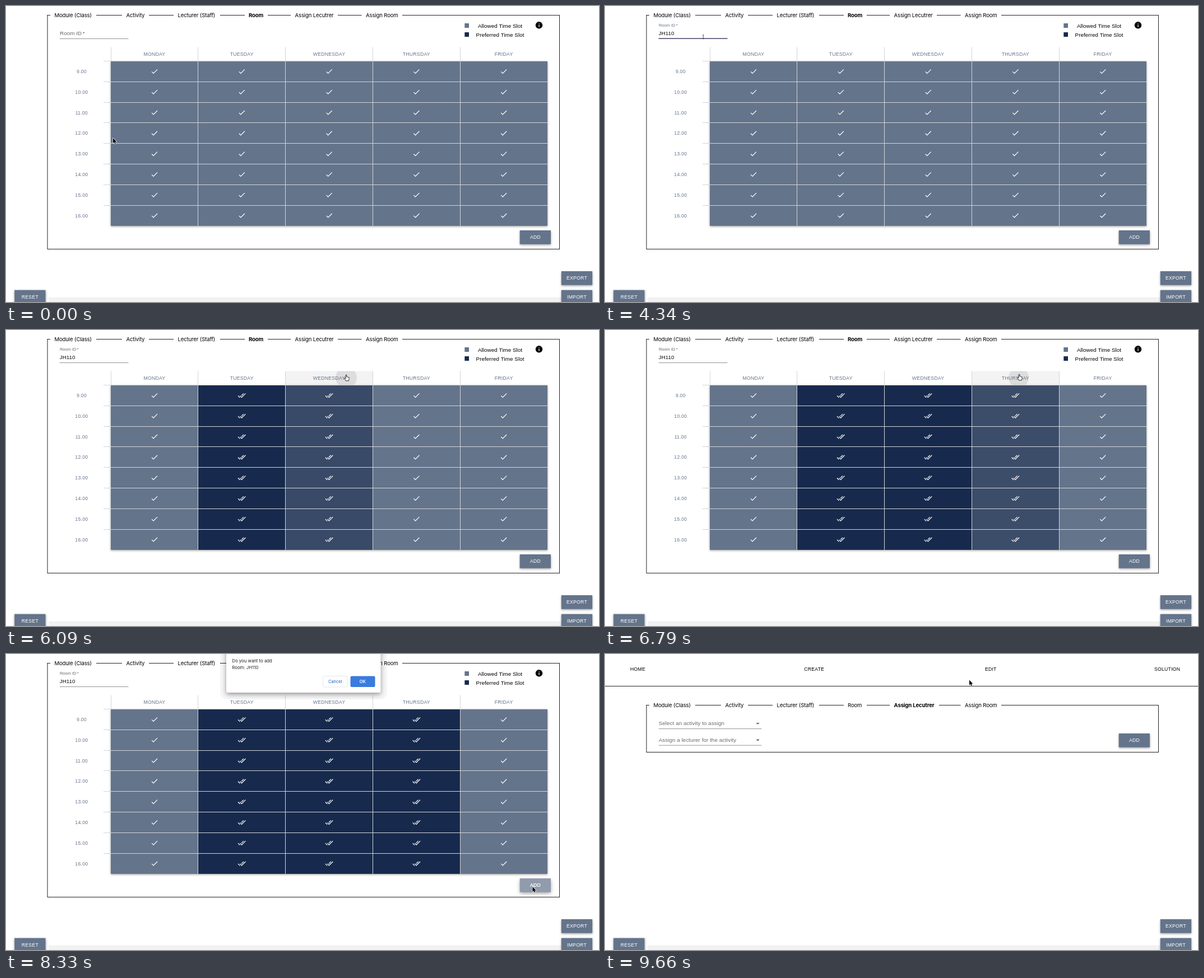
An HTML page with a canvas that plays this animation: 1058 by 529 pixels, repeating every 9.87 s.

```html
<!DOCTYPE html>
<html lang="en">
<head>
<meta charset="utf-8">
<title>Room timetable form</title>
<style>
html, body { margin: 0; width: 100%; height: 100%; overflow: hidden; background: #fff; }
canvas { display: block; }
</style>
</head>
<body>
<canvas width="1058" height="529"></canvas>
<script>
const c = document.querySelector('canvas').getContext('2d');
const LOOP = 9870, STEP = 70;
const SLATE = [100, 116, 139], NAVY = [23, 42, 77], FADED = [145, 157, 174];
const SANS = '"Liberation Sans", Arial, sans-serif', UI = 'Inter, sans-serif';
const GRID = { x: 187, y: 98.5, w: 155.8, h: 36.8, cols: 5, rows: 8 };
const RIGHT = GRID.x + GRID.w * GRID.cols, BOTTOM = GRID.y + GRID.h * GRID.rows;
const DAYS = ['MONDAY', 'TUESDAY', 'WEDNESDAY', 'THURSDAY', 'FRIDAY'];
const TABS = [['Module (Class)', 86.5], ['Activity', 214.5], ['Lecturer (Staff)', 306.5],
  ['Room', 433], ['Assign Lecutrer', 515.5], ['Assign Room', 642]];

const CHECK = new Path2D('M9 16.17 4.83 12l-1.42 1.41L9 19 21 7l-1.41-1.41z');
const DOUBLE = new Path2D('m18 7-1.41-1.41-6.34 6.34 1.41 1.41L18 7zm4.24-1.41L11.66 16.17 7.48 12l-1.41 1.41L11.66 19l12-12-1.42-1.41zM.41 13.41 6 19l1.41-1.41L1.83 12 .41 13.41z');
const ARROW = new Path2D('M0 0V9.2L2.1 7.3 3.4 10.2 4.9 9.6 3.7 6.7H6.4Z');
const HAND = new Path2D('M-.9.6Q0-.5.9.6V3.9Q1.8 3.2 2.4 4.2 3.3 3.6 3.9 4.6 5 4.2 5.1 5.4V7.6Q5 9 4.2 10.8H-.8Q-1.6 8.9-3.2 7.2-3.7 6-2.4 6L-.9 7Z');

// Pointer tip as [time, x, y]
const POINTER = [[0, 191, 236], [210, 191, 236], [560, 137.5, 51.5], [4270, 137.5, 51.5],
  [4550, 379, 76], [4690, 379, 76], [4970, 404, 79], [5390, 404, 79], [5740, 607, 80],
  [6160, 607, 80], [6510, 739, 79], [6860, 739, 79], [7280, 947, 377], [7490, 947, 377],
  [7770, 939.5, 416], [8680, 939.5, 416], [9310, 650, 46.5]];
// Column clicks as [column, time, x, y]
const CLICKS = [[1, 5137, 404, 85], [2, 5995, 607, 85], [3, 6700, 738, 85]];
// Typed text as [time, value]
const TYPED = [[2380, 'J'], [2660, 'JH'], [3500, 'JH1'], [3710, 'JH11'], [3850, 'JH110']];
const CARET = [[1190, 1750], [2310, 3150], [3500, 4340], [4830, 5180]];

const clamp = v => Math.min(1, Math.max(0, v));
const mix = (a, b, k) => a + (b - a) * k;
const rgb = (a, b = a, k = 0) => `rgb(${a.map((v, i) => mix(v, b[i], k))})`;
const easeOut = v => 1 - (1 - clamp(v)) ** 3;

// cubic-bezier(.4, 0, .2, 1)
function ease(v) {
  v = clamp(v);
  let lo = 0, hi = 1, s;
  for (let i = 0; i < 18; i++) {
    s = (lo + hi) / 2;
    if (1.2 * s * (1 - s) ** 2 + .6 * s * s * (1 - s) + s ** 3 < v) lo = s; else hi = s;
  }
  return 3 * s * s * (1 - s) + s ** 3;
}

function text(str, x, y, size, color, { align = 'left', gap = .07, font = SANS, weight = 400 } = {}) {
  c.font = `${weight} ${size}px ${font}`;
  c.letterSpacing = gap + 'px';
  c.textAlign = align;
  c.fillStyle = color;
  c.fillText(str, x, y);
}
const caps = (str, x, y, color, align = 'center') => text(str, x, y, 8.67, color, { align, gap: .25 });

function rect(x, y, w, h, color) {
  c.fillStyle = color;
  c.fillRect(x, y, w, h);
}
const hline = (x1, x2, y, color, h = 1) => rect(x1, y, x2 - x1, h, color);

function shadowed(blur, dy, alpha, draw) {
  c.save();
  c.shadowColor = `rgba(0,0,0,${alpha})`;
  c.shadowBlur = blur;
  c.shadowOffsetY = dy;
  draw();
  c.restore();
}

function rounded(x, y, w, h, r, fill, stroke) {
  c.beginPath();
  c.roundRect(x, y, w, h, r);
  c.fillStyle = fill;
  c.fill();
  if (stroke) { c.strokeStyle = stroke; c.lineWidth = 1; c.stroke(); }
}

function icon(path, x, y) {
  c.save();
  c.translate(x, y);
  c.scale(.619, .619);
  c.translate(-12, -12);
  c.fillStyle = '#fff';
  c.fill(path);
  c.restore();
}

function ripple(x, y, r, color, box) {
  c.save();
  c.beginPath();
  c.rect(...box);
  c.clip();
  c.beginPath();
  c.arc(x, y, r, 0, 7);
  c.fillStyle = color;
  c.fill();
  c.restore();
}

function button(label, x, y, color = rgb(SLATE), lift = 0) {
  shadowed(4 + 3 * lift, 1.5 + lift, .4, () => rect(x, y, 55.3, 24.7, color));
  caps(label, x + 27.7, y + 15.4, '#fff');
}

function frameBox(top, bottom, active) {
  hline(73.5, 79, top, '#222');
  hline(707, 988, top, '#222');
  hline(73.5, 988, bottom, '#222');
  rect(73.5, top, 1, bottom - top, '#222');
  rect(987, top, 1, bottom - top, '#222');
  const dashes = [[161, 207], [255, 299], [382, 426], [467, 508], [active == 4 ? 596 : 592, 634.5]];
  for (const [a, b] of dashes) hline(a, b, top, '#222');
  TABS.forEach(([name, x], i) => text(name, x, top + 3.6, 9.6, '#000',
    { font: UI, gap: -.15, weight: i == active ? 700 : 400 }));
}

function pointerAt(t) {
  let i = POINTER.findIndex(p => p[0] > t);
  if (i < 0) return POINTER.at(-1).slice(1);
  const [t0, x0, y0] = POINTER[i - 1], [t1, x1, y1] = POINTER[i];
  let k = (t - t0) / (t1 - t0);
  k = k * k * (3 - 2 * k);
  return [mix(x0, x1, k), mix(y0, y1, k)];
}

function drawPointer(t, x, y, hand) {
  if (t >= 2310 && t < 4340) return;
  if (x > 96 && x < 219 && y > 40 && y < 60) {
    rect(x - .4, y - 3.5, .8, 7, '#333');
    hline(x - 1.5, x + 1.5, y - 3.8, '#333', .7);
    hline(x - 1.5, x + 1.5, y + 3.1, '#333', .7);
    return;
  }
  c.save();
  c.translate(x, y);
  c.lineJoin = 'round';
  c.lineWidth = hand ? .9 : 1.3;
  c.strokeStyle = hand ? '#111' : '#fff';
  c.fillStyle = hand ? '#fff' : '#000';
  if (hand) c.fill(HAND);
  c.stroke(hand ? HAND : ARROW);
  if (!hand) c.fill(ARROW);
  c.restore();
}

function roomField(t) {
  const up = easeOut((t - 1150) / 200);
  const line = t < 5140 ? up : 1 - easeOut((t - 5140) / 200);
  const focused = t >= 1190 && t < 5180;
  const size = mix(9.8, 7.35, up);
  const color = focused ? '#64708a' : '#666';
  text('Room ID', 96, mix(52.3, 36.6, up), size, color);
  text('*', 96 + size * 4.17, mix(52.3, 36.6, up), size, color);
  hline(95.7, 218.5, 58, '#949494');
  if (line > 0) hline(157 - 61.4 * line, 157 + 61.4 * line, 57.4, '#4a426b', 1.4);
  const value = TYPED.findLast(([at]) => t >= at)?.[1] ?? '';
  text(value, 95.7, 52.3, 9.8, '#111');
  if (CARET.some(([a, b]) => t >= a && t < b))
    rect(96 + (value && c.measureText(value).width), 43.5, .9, 11, '#111');
}

function legend() {
  rect(818.3, 31, 7.7, 8, rgb(SLATE));
  rect(818.3, 47, 7.7, 8, rgb(NAVY));
  text('Allowed Time Slot', 881.5, 38.5, 9.8, '#000', { align: 'center' });
  text('Preferred Time Slot', 881.5, 54.6, 9.8, '#000', { align: 'center' });
  c.beginPath();
  c.arc(951, 34.3, 6.2, 0, 7);
  c.fillStyle = '#000';
  c.fill();
  rect(950.4, 33.7, 1.3, 3.8, '#fff');
  rect(950.4, 31.2, 1.3, 1.3, '#fff');
}

function timetable(t, hover) {
  const { x, y, w, h, cols, rows } = GRID;
  if (hover >= 0) rect(x + hover * w, 73.5, w, 25, '#f3f3f3');
  for (const [col, at, px, py] of CLICKS) {
    const k = (t - at) / 550;
    if (k >= 0 && k < 1)
      ripple(px, py, 11 + 85 * ease(k), `rgba(0,0,0,${.11 * (1 - k)})`, [x + col * w, 73.5, w, 25]);
  }
  shadowed(4, 1.5, .4, () => rect(x, y, RIGHT - x, BOTTOM - y, rgb(SLATE)));
  for (let i = 0; i < cols; i++) {
    const left = x + i * w, mid = left + w / 2;
    const click = CLICKS.find(([col, at]) => col == i && t >= at);
    if (click) rect(left, y, w, BOTTOM - y, rgb(SLATE, NAVY, ease((t - click[1]) / 250)));
    caps(DAYS[i], mid, 89.1, rgb(SLATE));
    rect(Math.floor(left), 73.5, 1, (i ? BOTTOM : y) - 73.5, '#d2d5da');
    for (let r = 0; r < rows; r++) icon(click ? DOUBLE : CHECK, mid, y + (r + .5) * h);
  }
  for (let r = 0; r < rows; r++) {
    hline(174, RIGHT, Math.floor(y + r * h), '#d2d5da');
    caps(`${9 + r}.00`, 134.8, y + (r + .5) * h + 3.1, rgb(SLATE));
  }
}

function dialog(t) {
  const pressed = t >= 9380;
  rounded(382, -20, 298, 101, 12, 'rgba(0,0,0,.035)');
  shadowed(9, 3, .4, () => rounded(393, -20, 275.5, 89, 3, '#fff'));
  text('Do you want to add', 403.3, 14.6, 7.8, '#222', { font: UI, gap: 0 });
  text('Room: JH110', 403.3, 26.8, 7.8, '#222', { font: UI, gap: 0 });
  rounded(565.5, 39.5, 43.5, 19.5, 2.5, '#fff', '#e4e6ea');
  rounded(614.5, 39.5, 44, 19.5, 2.5, pressed ? '#2f66bf' : '#3a7be0');
  text('Cancel', 587.2, 52, 7.4, '#3a75d0', { font: UI, gap: 0, weight: 500, align: 'center' });
  text('OK', 636.3, 52, 7.4, '#fff', { font: UI, gap: 0, weight: 600, align: 'center' });
}

function roomPage(t, px, py) {
  const overHeader = t < 8400 && py > 73 && py < 98 && px > GRID.x && px < RIGHT;
  frameBox(16, 434, 3);
  roomField(t);
  legend();
  timetable(t, overHeader ? Math.floor((px - GRID.x) / GRID.w) : -1);
  const pulse = (t - 7960) / 500;
  const over = t >= 7700 && t < 8820;
  button('ADD', 916.7, 401, rgb(SLATE, FADED, clamp(pulse - .3)), over ? 1 : 0);
  if (pulse > 0) {
    const box = [916.7, 401, 55.3, 24.7];
    if (pulse < 1) ripple(940, 416, 40 * ease(pulse), `rgba(255,255,255,${.28 * (1 - pulse / 2)})`, box);
    else rect(...box, rgb(FADED));
    caps('ADD', 944.4, 416.4, '#fff');
  }
  if (t >= 8190 && t < 9450) dialog(t);
  drawPointer(t, px, py, overHeader);
}

function select(label, y) {
  text(label, 95.7, y, 9.8, '#6b6b6b');
  hline(95.7, 279.5, y + 5.9, '#949494');
  c.beginPath();
  c.moveTo(269.5, y - 4.2);
  c.lineTo(275.7, y - 4.2);
  c.lineTo(272.6, y - 1.1);
  c.fillStyle = '#666';
  c.fill();
}

function assignPage(t, px, py) {
  caps('HOME', 45, 30.2, '#000', 'left');
  caps('CREATE', 373.3, 30.2, '#000');
  caps('EDIT', 688.3, 30.2, '#000');
  caps('SOLUTION', 1026.3, 30.2, '#000', 'right');
  hline(0, 1058, 57, '#222');
  frameBox(91, 175, 4);
  select('Select an activity to assign', 127.2);
  select('Assign a lecturer for the activity', 156.8);
  button('ADD', 916.7, 142);
  drawPointer(t, px, py, false);
}

function draw(now) {
  const t = Math.floor(now % LOOP / STEP) * STEP;
  rect(0, 0, 1058, 529, '#fff');
  rect(76, 520.5, 915, 9, '#f2f2f2');
  button('EXPORT', 990.8, 474);
  button('IMPORT', 990.8, 507.7);
  button('RESET', 15.2, 507.7);
  (t < 9520 ? roomPage : assignPage)(t, ...pointerAt(t));
}

const start = performance.now();
function tick() {
  draw(performance.now() - start);
  requestAnimationFrame(tick);
}
tick();
</script>
</body>
</html>
```
